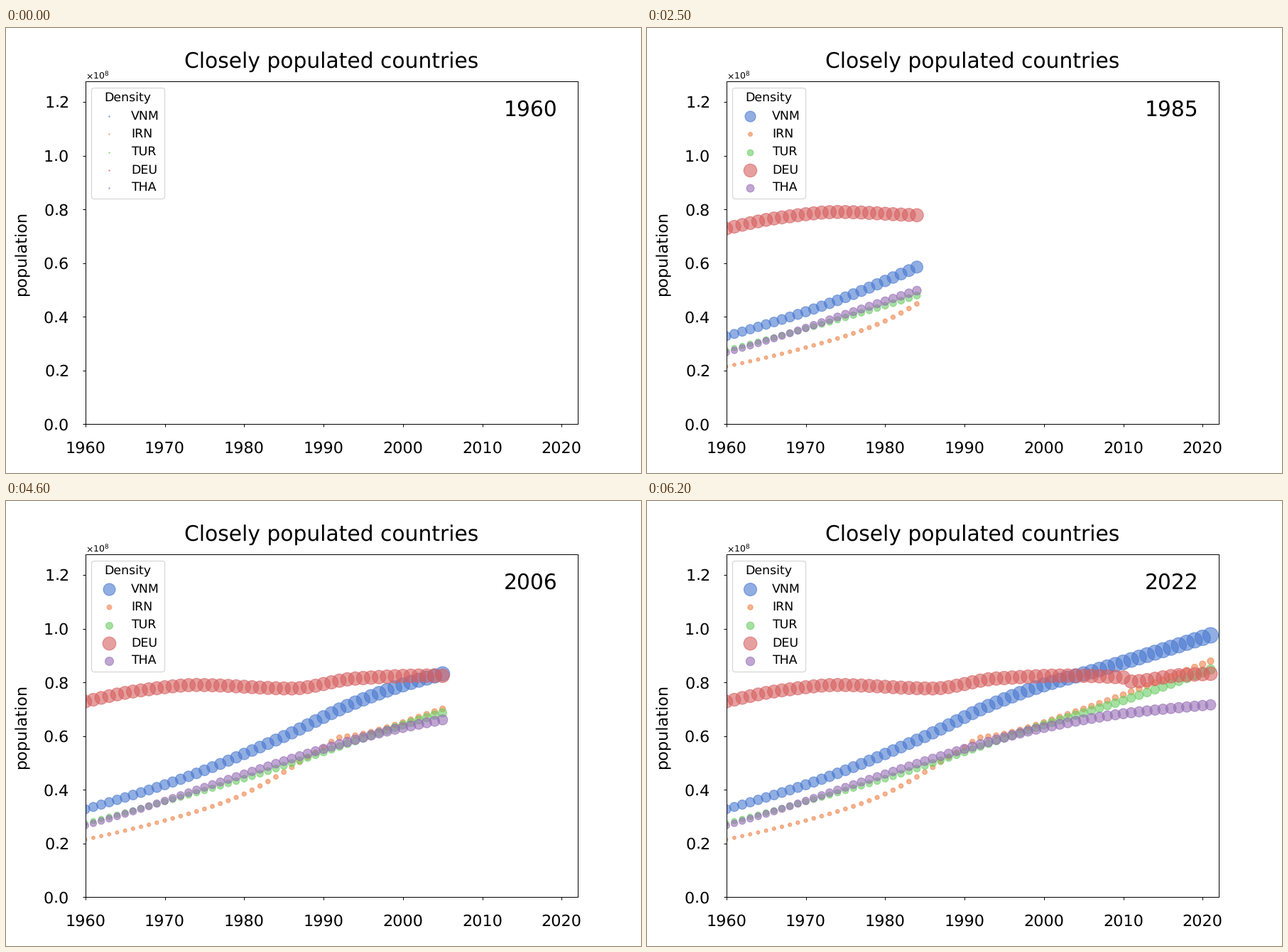
Write a matplotlib script that moves like this. It is 894 px wide and 626 px high and loops after 6300 ms.

```python
import matplotlib.pyplot as plt
import numpy as np
from matplotlib.animation import FuncAnimation

W, H, DPI = 894, 626, 89.4
START, END = 1960, 2022
YEARS = np.arange(START, END)

# code: (colour, land area in 1000 km2, turning points (year, millions))
COUNTRIES = {
    "VNM": ("#4878D0", 313.4, [
        (1960, 32.7), (1972, 43.9), (1985, 59.8), (1993, 71.2),
        (2000, 79.0), (2007, 84.8), (2021, 97.5)]),
    "IRN": ("#EE854A", 1622, [
        (1960, 21.4), (1970, 28.5), (1979, 37.1), (1990, 55.7),
        (1992, 59.4), (1994, 60.2), (2004, 69.1), (2021, 87.9)]),
    "TUR": ("#6ACC64", 769.6, [
        (1960, 27.5), (1980, 44.1), (2000, 64.1), (2010, 73.2),
        (2021, 84.8)]),
    "DEU": ("#D65F5F", 349, [
        (1960, 72.8), (1967, 77.0), (1974, 79.0), (1986, 77.7),
        (1994, 81.4), (2003, 82.5), (2010, 81.8), (2011, 80.3),
        (2017, 82.6), (2021, 83.2)]),
    "THA": ("#956CB4", 510.9, [
        (1960, 26.6), (1966, 31.9), (1976, 41.9), (1990, 55.2),
        (2000, 63.1), (2010, 68.3), (2021, 71.6)]),
}


def smooth(x, keys):
    """Monotone cubic curve through the key points."""
    t, v = np.array(keys).T
    rise = np.diff(v) / np.diff(t)
    a, b = rise[:-1], rise[1:]
    mid = np.where(a * b > 0, 2 * a * b / (a + b), 0)
    slope = np.r_[1.5 * rise[0] - 0.5 * mid[0], mid,
                  1.5 * rise[-1] - 0.5 * mid[-1]]
    i = np.clip(np.searchsorted(t, x, side="right") - 1, 0, len(rise) - 1)
    h, d, m0, m1 = t[i + 1] - t[i], rise[i], slope[i], slope[i + 1]
    u = (x - t[i]) / h
    return v[i] + h * u * (m0 + u * (3 * d - 2 * m0 - m1)
                           + u * u * (m0 + m1 - 2 * d))


# Unhinted glyphs keep line heights in proportion at this resolution.
plt.rcParams["text.hinting"] = "none"

# The small margin keeps the pixel size from rounding down.
fig, ax = plt.subplots(figsize=((W + 0.01) / DPI, (H + 0.01) / DPI), dpi=DPI)
fig.subplots_adjust(left=0.125, right=0.9, bottom=0.11, top=0.88)

ax.set_title("Closely populated countries", fontsize=24, pad=15)
ax.set_ylabel("population", fontsize=18, labelpad=15)
ax.tick_params(labelsize=18, pad=15.5)
ax.ticklabel_format(axis="y", style="sci", useMathText=True)
ax.set_xticks(range(START, END, 10))
ax.set_yticks(np.arange(7) * 2e7)
ax.set_xlim(START, END)
ax.set_ylim(0, 1.2765e8)
year_text = ax.text(0.85, 0.9, "", fontsize=24, transform=ax.transAxes)

series = []
for code, (color, area, keys) in COUNTRIES.items():
    millions = smooth(YEARS, keys)
    points = np.column_stack([YEARS, millions * 1e6])
    density = millions * 1000 / area
    dots = ax.scatter([], [], color=color, alpha=0.6, label=code)
    series.append((dots, points, density))

legend = ax.legend(title="Density", loc="upper left", fontsize=14,
                   title_fontsize=14)


def update(frame):
    year_text.set_text(str(START + frame))
    for (dots, points, density), key in zip(series, legend.legend_handles):
        shown = density[:frame]
        dots.set_offsets(points[:frame])
        dots.set_sizes(shown)
        # The legend dot shows the middle of the size range so far.
        key.set_sizes([(shown.min() + shown.max()) / 2 if frame else 1])


anim = FuncAnimation(fig, update, frames=END - START + 1, interval=100,
                     init_func=lambda: update(0), repeat=True,
                     repeat_delay=0, blit=False)
plt.show()
```
